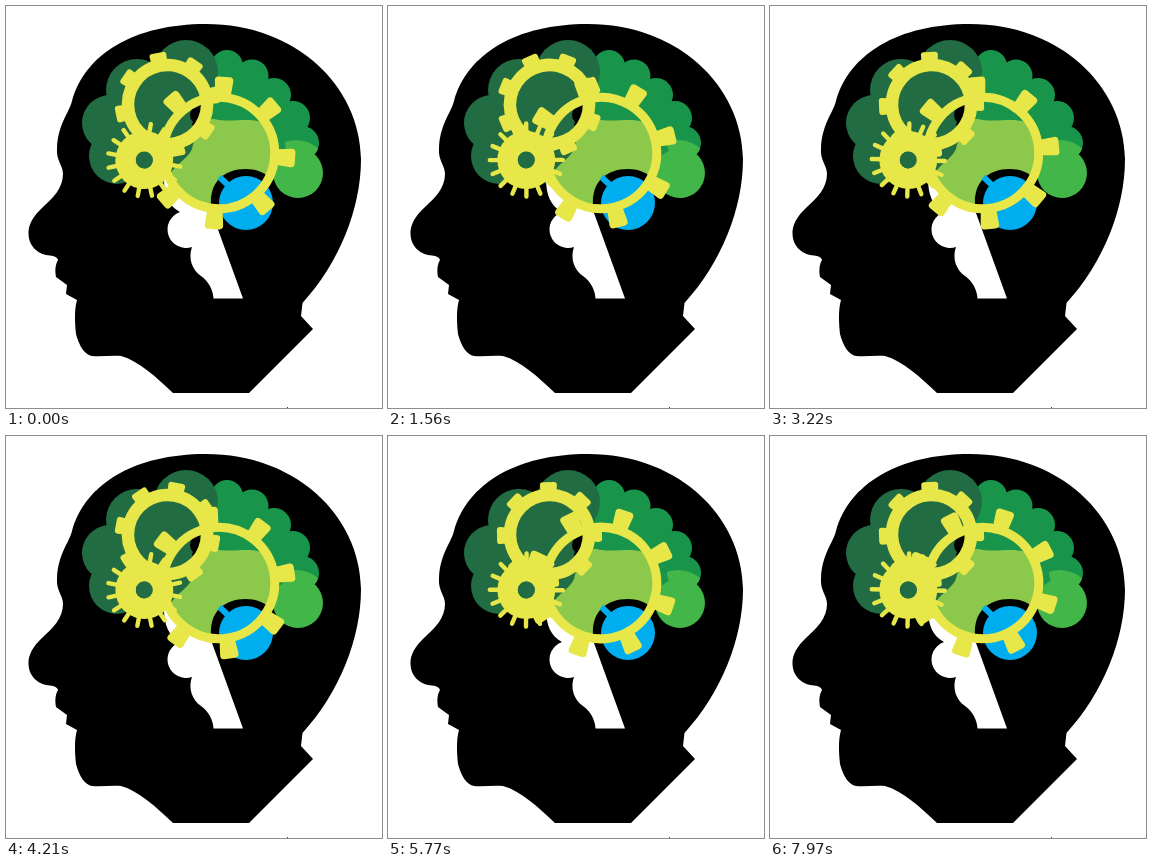
An HTML page for the animation above (8 s loop, 376 by 402 pixels).

```html
<!DOCTYPE html>
<html lang="en">
<head>
<meta charset="utf-8">
<title>Thinking gears</title>
<style>
  html, body { margin: 0; width: 100%; height: 100%; overflow: hidden; background: #fff; }
  svg { display: block; width: 376px; height: 402px; }
</style>
</head>
<body>
<svg viewBox="0 0 376 402" xmlns="http://www.w3.org/2000/svg">
  <clipPath id="cap"><circle cx="290" cy="167" r="33"/></clipPath>

  <path d="M167 387 H243 L307 323 L295 310 L296.500 297 C333 257 355 203 355 153
           C354 79 289 18 200 18 C128 18 79 48 66 95 C63 107 52 118 51 142
           C50 155 57 159 57 168 C57 182 47 192 37 201 C27 210 22 219 22.500 228
           C23 242 34 249 44 249.500 Q51 250 52 254 C49 259 49 265 50 271 L61 279 L60 288
           L71 294 C68 304 69 318 70 328 C73 340 79 349 86 350 C96 351 105 349 115 350
           C133 355 150 371 167 387Z"/>
  <rect x="281" y="401" width="1" height="1" fill="#444"/>

  <g id="mid" fill="#19954b">
    <path d="M206 56 L221 60 L246 70 L268 89 L287 112 L296 137 L272 165 L200 150 L197 100Z"/>
  </g>
  <g id="dark" fill="#226c43">
    <path d="M104 117 L130 85 L180 65 L200 92 L186 118 L194 150 L165 180 L120 165Z"/>
  </g>
  <circle cx="194" cy="109" r="10"/>
  <g fill="#43b649">
    <circle cx="292" cy="167" r="25"/>
    <circle cx="296" cy="137" r="17" clip-path="url(#cap)"/>
  </g>

  <path fill="#fff" d="M158 172 C158 190 163 200 174 206 A18.500 18.500 0 0 0 186 241
           C182 252 186 264 195 270 C203 276 207 284 207.500 292.500
           H237 L206 207 L193 189 L170 170Z"/>
  <path fill="#8cc84b" d="M162.500 170.500 C170 157 182 153 186 143 C190 128 194 112 208 113
           C225 117 242 111 255 116 C267 122 264 140 268 152 L268 172 L240 196
           L198.600 200.800 A55.700 55.700 0 0 1 162.500 170.500Z"/>
  <path d="M205 200 C203 176 218 163 240 163 C258 163 270 174 272 188 L240 210Z"/>
  <circle cx="240" cy="197" r="27" fill="#00aeef"/>
  <path d="M213.500 171 L226 183" stroke="#00aeef" stroke-width="6"/>

  <g id="gears" fill="#e7e749" stroke="#e7e749"></g>
  <circle cx="138.300" cy="154" r="8.500" fill="#226c43"/>
</svg>
<script>
const LOOP = 8000;
const TURN = 1950; // ms for one turn of the large gear
const NS = 'http://www.w3.org/2000/svg';

function add(parent, tag, attrs) {
  const el = document.createElementNS(NS, tag);
  for (const key in attrs) el.setAttribute(key, attrs[key]);
  return parent.appendChild(el);
}

function blobs(id, list) {
  const group = document.getElementById(id);
  for (const [cx, cy, r] of list) add(group, 'circle', { cx, cy, r });
}

blobs('mid', [[221, 60, 16], [246, 70, 16.5], [268, 89, 17], [287, 112, 17], [296, 137, 17]]);
blobs('dark', [[180, 66, 32], [131, 84, 31], [104, 117, 28], [111, 150, 28], [150, 150, 28]]);

function makeGear({ x, y, r, rim, count, tooth, phase, ratio }) {
  const el = add(document.getElementById('gears'), 'g', {});
  add(el, 'circle', { r, fill: 'none', 'stroke-width': rim });
  for (let i = 0; i < count; i++) {
    add(el, 'path', {
      d: tooth.d,
      'stroke-width': tooth.stroke,
      'stroke-linejoin': 'round',
      'stroke-linecap': 'round',
      transform: `rotate(${i * 360 / count})`
    });
  }
  return t => el.setAttribute('transform',
    `translate(${x} ${y}) rotate(${phase + ratio * 360 * t / TURN})`);
}

const gears = [
  { x: 161.5, y: 98.5, r: 39.5, rim: 12.5, count: 8, phase: 34, ratio: -2 / 3,
    tooth: { d: 'M43 -5 L49.5 -5.5 L49.5 5.5 L43 5Z', stroke: 6 } },
  { x: 138.3, y: 154, r: 18.7, rim: 20.4, count: 16, phase: 10.2, ratio: 2 / 3,
    tooth: { d: 'M26 0 H36.5', stroke: 4.4 } },
  { x: 213, y: 147, r: 55.7, rim: 9, count: 8, phase: 4.2, ratio: -1,
    tooth: { d: 'M58 -4 L72.5 -5.5 L72.5 5.5 L58 4Z', stroke: 7.5 } }
].map(makeGear);

function draw(t) {
  for (const turnTo of gears) turnTo(t);
}

const start = performance.now();
function tick() {
  draw((performance.now() - start) % LOOP);
  requestAnimationFrame(tick);
}
draw(0);
requestAnimationFrame(tick);
</script>
</body>
</html>
```
